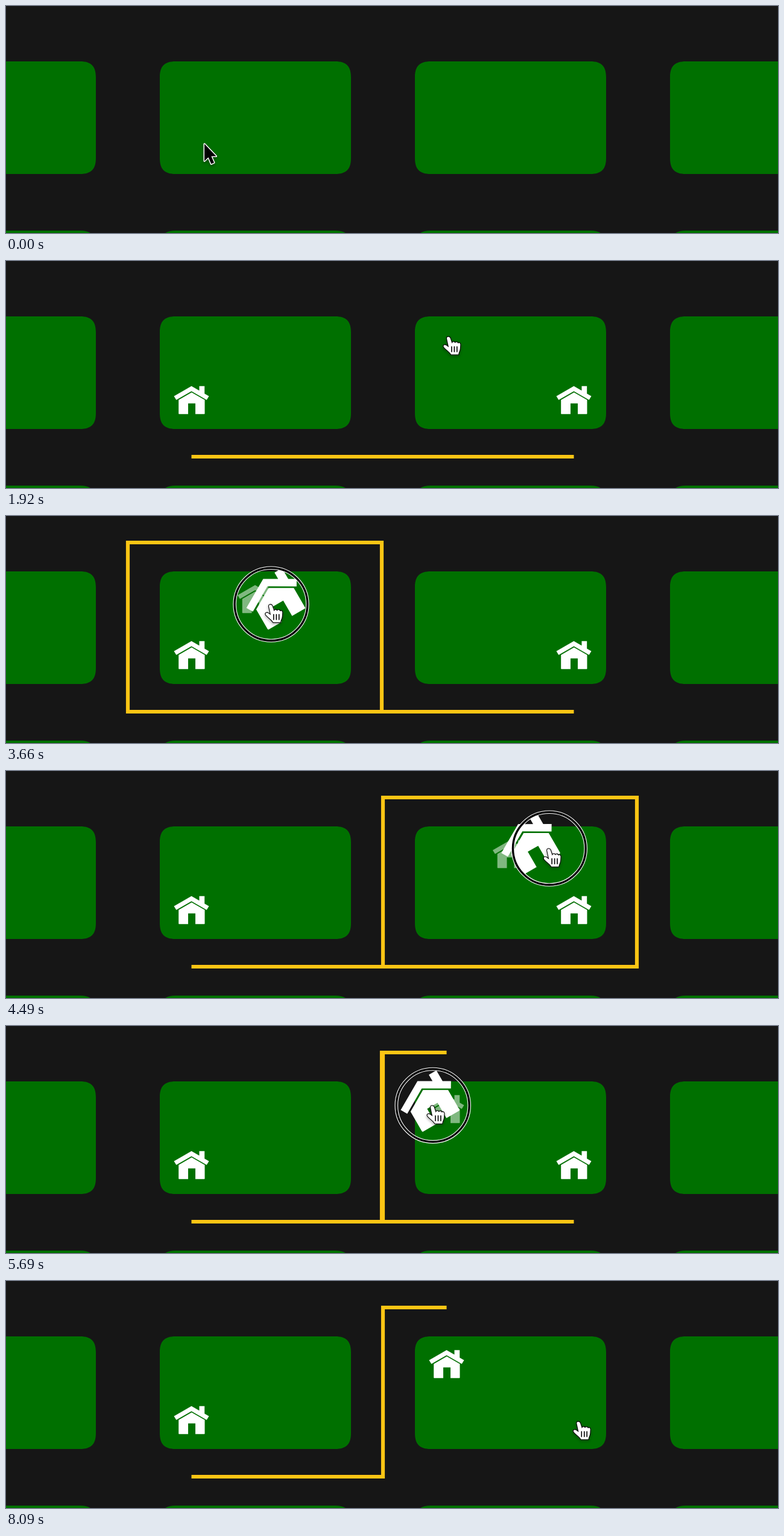
An HTML page with a canvas that plays this animation: 1280 px wide and 377 px high, repeating every 8.12 s.

```html
<!DOCTYPE html>
<html lang="en">
<head>
<meta charset="utf-8">
<title>House grid</title>
<style>
  html, body { margin: 0; width: 100%; height: 100%; overflow: hidden; background: #161616; }
  canvas { display: block; width: 1280px; height: 377px; }
</style>
</head>
<body>
<canvas id="stage" width="1280" height="377"></canvas>
<script>
const ctx = document.getElementById('stage').getContext('2d');
const LOOP = 8120;
const PITCH = { x: 423, y: 281 };
const CARD = { x: 255, y: 92, w: 317, h: 187 };
const SLOT = 105.5;
const GAP = 625;

// Pointer moves: begin, end, target
const MOVES = [
  [60, 240, 319, 227], [520, 1064, 947, 228], [1500, 1950, 732, 124],
  [3330, 3690, 434, 147], [3690, 4090, 196, 150], [4160, 4613, 1054, 124],
  [4613, 4960, 960, 320], [4960, 5300, 324, 200], [5300, 5720, 713, 131],
  [5720, 6200, 900, 325], [6200, 6600, 732, 130], [6850, 7150, 950, 233]
];
const [PLACE_1, PLACE_2, PLACE_3, REMOVE_2] = [400, 1380, 2160, 7340];
const PRESS = 120;
const DRAG = { from: 3200, to: 6750, lag: 14, lift: 8, scale: 1.66 };

const house = new Path2D(
  'M0-23.3L29-6.6 25.2-.2 0-14.8-25.2-.2-29-6.6Z' +
  'M.3-12.8L22-.3V22.5L21.5 23.2H6.5V5.5H-5.5V23.2H-20.8L-21.3 22.5V-.3Z' +
  'M13-23.2H21.7V-8L13-14Z');
const arrow = new Path2D('M1 1V29.5L7.5 23.2 12.3 34.3 17 32.2 12.3 21.5H20.5Z');
const hand = new Path2D('M-3.5 4C-4.5 0 .5-.5 2 3L5 12C5.5 8 9.5 8.5 10 11.5C11 8.5 14.5 9 15 12' +
  'C16 10 18.5 10.5 18.7 13.5L18.3 20C18 24 16 26 15.5 30H3.5C1.5 26-5 22-8.3 18C-10.5 15-7.5 13-4.5 15L-.5 18Z');
const fingers = new Path2D('M4.3 17V25.5M8.8 17V25.5M13.2 17V25.5');

const clamp = (v, lo, hi) => Math.min(hi, Math.max(lo, v));
const ease = u => u * u * (3 - 2 * u);
const trackY = row => 44 + row * PITCH.y;
const slotY = row => 138 + row * 93;

// Each move carries the pointer on from wherever the previous one left it
function pointer(t) {
  const p = { x: 328, y: 228 };
  for (const [begin, end, x, y] of MOVES) {
    const e = ease(clamp((t - begin) / (end - begin), 0, 1));
    p.x += (x - p.x) * e;
    p.y += (y - p.y) * e;
  }
  return p;
}

function slotAt(p) {
  const col = clamp(Math.floor((p.x - GAP) / PITCH.x) + 1, 0, 1);
  const first = CARD.x + 52.5 + col * PITCH.x;
  const i = clamp(Math.round((p.x - first) / SLOT), 0, 2);
  return { x: first + i * SLOT, row: p.y < 184.5 ? 0 : 1 };
}

// Rounded rectangle with slightly square corners
function cardPath(x, y, w, h) {
  const r = 26, k = 8;
  for (const [cx, cy, dx, dy] of [[x, y, 1, 1], [x + w, y, -1, 1], [x + w, y + h, -1, -1], [x, y + h, 1, -1]]) {
    const side = [cx, cy + dy * r, cx, cy + dy * k];
    const flat = [cx + dx * r, cy, cx + dx * k, cy];
    const [a, b] = dx === dy ? [side, flat] : [flat, side];
    if (cx === x && cy === y) ctx.moveTo(a[0], a[1]);
    else ctx.lineTo(a[0], a[1]);
    ctx.bezierCurveTo(a[2], a[3], b[2], b[3], b[0], b[1]);
  }
  ctx.closePath();
}

function drawCards() {
  ctx.fillStyle = '#007000';
  ctx.beginPath();
  for (let row = 0; row < 2; row++)
    for (let col = -1; col < 3; col++)
      cardPath(CARD.x + col * PITCH.x, CARD.y + row * PITCH.y, CARD.w, CARD.h);
  ctx.fill();
}

function drawHouse(x, y, { scale = 1, angle = 0, alpha = 1 } = {}) {
  ctx.save();
  ctx.translate(x, y);
  ctx.rotate(angle);
  ctx.scale(scale, scale);
  ctx.globalAlpha = alpha;
  ctx.fillStyle = '#fff';
  ctx.fill(house);
  ctx.restore();
}

// Joins two houses along their tracks, through the nearest gap when the rows differ
function addLink(a, b, shift) {
  const [ya, yb] = [trackY(a.row), trackY(b.row)];
  ctx.moveTo(a.x, ya);
  if (ya !== yb) {
    const cost = g => Math.abs(a.x - g) + Math.abs(b.x - g);
    const gap = [-1, 0, 1].map(k => GAP + k * PITCH.x).reduce((p, q) => cost(q) < cost(p) ? q : p) + shift;
    ctx.lineTo(gap, ya);
    ctx.lineTo(gap, yb);
  }
  ctx.lineTo(b.x, yb);
}

function drawLinks(first, second, third) {
  ctx.strokeStyle = '#fcc514';
  ctx.lineWidth = 6.2;
  ctx.lineJoin = 'miter';
  ctx.lineCap = 'butt';
  ctx.beginPath();
  if (first && second) addLink(first, second, 0);
  if (first && third) addLink(first, third, 0);
  if (second && third) addLink(second, third, -2);
  ctx.stroke();
}

function drawRing(p) {
  ctx.beginPath();
  ctx.arc(p.x, p.y, 60.4, 0, 7);
  for (const [color, width] of [['#fff', 5.6], ['#000', 3.4]]) {
    ctx.strokeStyle = color;
    ctx.lineWidth = width;
    ctx.stroke();
  }
}

function drawCursor(p, isHand) {
  const shape = isHand ? hand : arrow;
  ctx.save();
  ctx.translate(p.x, p.y);
  ctx.lineJoin = ctx.lineCap = 'round';
  ctx.shadowColor = 'rgba(0,0,0,.45)';
  ctx.shadowBlur = 4;
  ctx.shadowOffsetY = 2;
  ctx.lineWidth = isHand ? 2.2 : 3;
  ctx.strokeStyle = isHand ? '#000' : '#fff';
  ctx.stroke(shape);
  ctx.shadowColor = 'transparent';
  ctx.fillStyle = isHand ? '#fff' : '#000';
  ctx.fill(shape);
  if (isHand) {
    ctx.lineWidth = 1.6;
    ctx.stroke(fingers);
  }
  ctx.restore();
}

function draw(t) {
  const tip = pointer(t);
  const held = pointer(t - DRAG.lag);
  held.y -= DRAG.lift;
  const dragging = t >= DRAG.from && t < DRAG.to;
  const pressing = [PLACE_1, PLACE_2, PLACE_3, REMOVE_2].some(end => t >= end - PRESS && t < end);

  const first = t >= PLACE_1 && slotAt({ x: 307, y: 231 });
  const second = t >= PLACE_2 && t < REMOVE_2 && slotAt({ x: 940, y: 231 });
  const third = t >= PLACE_3 && slotAt(dragging ? held : { x: 731, y: 138 });

  ctx.fillStyle = '#161616';
  ctx.fillRect(0, 0, 1280, 377);
  drawCards();
  drawLinks(first, second, third);

  for (const h of [first, second]) if (h) drawHouse(h.x, slotY(h.row));
  if (third) drawHouse(third.x, slotY(third.row), { alpha: dragging ? 0.5 : 1 });
  if (dragging) drawHouse(held.x, held.y, { scale: DRAG.scale, angle: -Math.PI / 6 });
  if (dragging || pressing) drawRing(tip);

  const inCard = (tip.x + PITCH.x - CARD.x) % PITCH.x < CARD.w && tip.y > CARD.y && tip.y < CARD.y + CARD.h;
  drawCursor(tip, dragging || (t >= 60 && inCard));
}

const start = performance.now();
function tick() {
  draw((performance.now() - start) % LOOP);
  requestAnimationFrame(tick);
}
tick();
</script>
</body>
</html>
```
